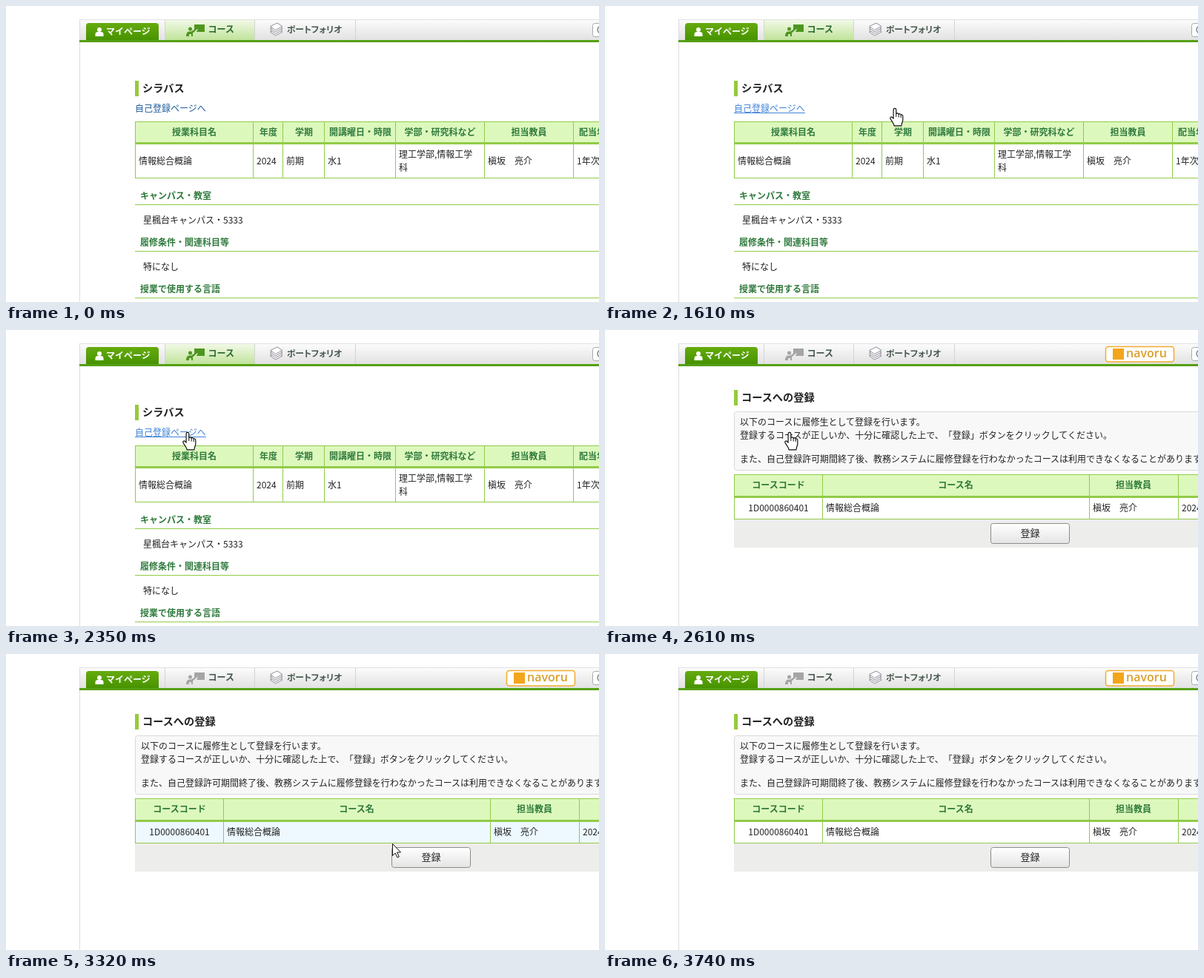
An HTML page for the animation above (4670 ms loop, 800 by 400 pixels).

```html
<!DOCTYPE html>
<html lang="ja">
<head>
<meta charset="utf-8">
<title>シラバス</title>
<style>
html, body { margin: 0; width: 100%; height: 100%; overflow: hidden; background: #fff; }
svg { display: block; width: 800px; height: 400px; }
text { font: 12px "Noto Sans CJK JP", "Noto Sans CJK", sans-serif; text-spacing-trim: space-all; fill: #222; }
.b { font-weight: 700; }
.head { font-weight: 700; fill: #2f7a3c; }
.title { font-size: 14.2px; font-weight: 700; }
.tight { font-size: 11.8px; font-feature-settings: "palt"; }
.logo { font: 600 16px "Open Sans", sans-serif; fill: #d9a02c; }
</style>
</head>
<body>
<svg id="stage" viewBox="0 0 800 400" xmlns="http://www.w3.org/2000/svg"></svg>
<script>
const LOOP = 4670;
const LINE = '#92cb48';

const rect = (x, y, w, h, fill, more = '') =>
  `<rect x="${x}" y="${y}" width="${w}" height="${h}" fill="${fill}" ${more}/>`;
const text = (x, y, s, cls = '', more = '') =>
  `<text x="${x}" y="${y}" class="${cls}" ${more}>${s}</text>`;
const mid = (x, y, s, cls) => text(x, y, s, cls, 'text-anchor="middle"');
const grad = (id, a, b) =>
  `<linearGradient id="${id}" x2="0" y2="1"><stop stop-color="${a}"/><stop offset="1" stop-color="${b}"/></linearGradient>`;

function table(top, headH, bottom, cols, rowId) {
  return rect(174, top, 626, headH, '#ddf8bd') +
    rect(174, top + headH, 626, bottom - top - headH, '#fff', `id="${rowId}"`) +
    rect(174, top, 626, 1, LINE) +
    rect(174, top + headH - 2, 626, 3, LINE) +
    rect(174, bottom, 626, 1, LINE) +
    cols.map(x => rect(x, top, 1, bottom - top, LINE)).join('');
}

const title = (y, s) => rect(174, y, 5, 21, '#96ca3c') + text(184, y + 15, s, 'title');

const section = (y, head, body) =>
  text(181, y, head, 'head') + rect(174, y + 7, 626, 1, LINE) + text(185, y + 33, body);

const defs = `<defs>
  ${grad('barFill', '#fcfcfc', '#e2e2e2')}
  ${grad('tabFill', '#65ab0c', '#479300')}
  ${grad('litFill', '#f1f9e6', '#c1e39b')}
  ${grad('btnFill', '#fff', '#e4e4e4')}
</defs>`;

const header =
  rect(99, 18, 701, 28, 'url(#barFill)') +
  rect(99, 18, 701, 1, '#e2e2e2') +
  rect(99, 18, 1, 382, '#dcdcdc') +
  rect(215, 19, 120, 27, 'url(#litFill)', 'id="lit"') +
  [214, 335, 471].map(x => rect(x, 19, 1, 27, '#d4d4d4')).join('') +
  rect(99, 46, 701, 3, '#559f13') +
  '<path d="M108 46V27q0-4 4-4h90q4 0 4 4v19z" fill="url(#tabFill)"/>' +
  '<g fill="#fff"><circle cx="126" cy="32" r="3"/><path d="M120.500 41v-3q0-3 3.500-3h4q3.500 0 3.500 3v3z"/></g>' +
  text(135, 38.5, 'マイページ', 'b', 'style="fill:#fff"') +
  `<g id="course">
    <path d="M254 25h14v10h-11l2-4-5 2z"/>
    <circle cx="248.500" cy="31" r="2.500"/>
    <path d="M243 41q0-6 4-6.500h3l6-4 1 1.500-5 4.500v4.500h-2v-3h-3v3z"/>
  </g>` +
  text(272.5, 36, 'コース', 'b', 'id="courseName"') +
  '<g fill="#fff" stroke="#918b99">' +
  [35, 32.5, 30, 27.5].map(y => `<path d="M356.500 ${y}l7 5 9.500-5-7-4.500z"/>`).join('') + '</g>' +
  text(379, 36, 'ポートフォリオ', 'b tight', 'style="fill:#47584e"') +
  rect(791.5, 23.5, 30, 18, '#fff', 'rx="3" stroke="#aaa"') +
  '<circle cx="803" cy="32" r="5" fill="none" stroke="#888" stroke-width="1.500"/>';

const heads = [[254, '授業科目名'], [354, '年度'], [402, '学期'], [478, '開講曜日・時限'],
  [585.5, '学部・研究科など'], [705.5, '担当教員'], [797, '配当年次']];
const cells = [[179, '情報総合概論'], [338, '2024'], [378, '前期'], [434, '水1'],
  [650, '槇坂　亮介'], [770, '1年次']];

const syllabus = '<g id="syllabus">' +
  title(101, 'シラバス') +
  text(174, 143, '自己登録ページへ', '', 'id="link"') +
  rect(174, 144, 96, 1, '#3f83d8', 'id="underline"') +
  table(156, 30, 232, [174, 333, 373, 429, 525, 645, 765], 'row1') +
  heads.map(([x, s]) => mid(x, 175, s, 'head')).join('') +
  cells.map(([x, s]) => text(x, 214, s)).join('') +
  text(530, 205, '理工学部,情報工学') + text(530, 223, '科') +
  section(261, 'キャンパス・教室', '星楓台キャンパス・5333') +
  section(324, '履修条件・関連科目等', '特になし') +
  section(387, '授業で使用する言語', '') +
  '</g>';

const entry = '<g id="entry">' +
  rect(675.5, 22.5, 92, 20.5, '#fff', 'rx="3.500" stroke="#f2ad2c" stroke-width="1.500"') +
  rect(685, 25, 15, 15, '#f3a51c') +
  text(703, 37, 'navoru', 'logo') +
  title(81, 'コースへの登録') +
  rect(174.5, 110.5, 640, 79, '#f8f8f8', 'rx="3" stroke="#dadada"') +
  text(182, 129, '以下のコースに履修生として登録を行います。') +
  text(182, 147, '登録するコースが正しいか、十分に確認した上で、「登録」ボタンをクリックしてください。') +
  text(182, 179, 'また、自己登録許可期間終了後、教務システムに履修登録を行わなかったコースは利用できなくなることがあります。') +
  table(195, 31, 255, [174, 293, 653, 773], 'row2') +
  mid(234, 214, 'コースコード', 'head') + mid(473, 214, 'コース名', 'head') + mid(713, 214, '担当教員', 'head') +
  mid(234, 245, '1D0000860401') + text(298, 245, '情報総合概論') +
  text(658, 245, '槇坂　亮介') + text(778, 245, '2024年度') +
  rect(174, 256, 626, 38, '#ededec') +
  rect(520.5, 261.5, 106, 27, 'url(#btnFill)', 'rx="3" stroke="#8c8c8c"') +
  text(573.5, 279, '登録', '', 'text-anchor="middle" style="font-size:13px"') +
  '</g>';

const pointer =
  '<circle id="click" cx="248" cy="139" r="12" fill="#ff0" fill-opacity=".47"/>' +
  '<g id="cursor" fill="#fff" stroke="#111" stroke-linejoin="round">' +
  '<path id="arrow" d="M.5 .5V16.500L4.200 13 7 19 9.300 18 6.600 12H11.500Z"/>' +
  `<g id="hand" transform="translate(1 0)"><path stroke-width="1.200" d="M-1.900 1.200C-1.900-1.200 1.800-1.200 1.800 1.200V6.600
    C2.600 5.400 5 5.600 5.200 7.300 6 6.300 8 6.600 8.200 8.200 9.200 7.500 10.800 8 10.800 9.800V15C10.800 17.500 9 19 9 22.800H-1
    C-1 20-4.500 16.500-6 13.300-6.800 11.500-4.800 10-3.300 11.600L-1.900 13.200Z"/>
    <path fill="none" d="M1.800 6.600V11M5.200 7.300V11.500M8.200 8.200V12"/></g>` +
  '</g>';

document.getElementById('stage').innerHTML = defs + header + syllabus + entry + pointer;
const $ = id => document.getElementById(id);
const show = (id, on) => $(id).setAttribute('visibility', on ? 'visible' : 'hidden');
const paint = (id, color) => { $(id).style.fill = color; };

// Pointer path: time, x, y
const path = [
  [1120, 576, 381], [1260, 556, 327], [1400, 505, 242], [1540, 428, 160], [1610, 390, 139],
  [1750, 318, 138], [1890, 256, 139], [1960, 248, 139], [2610, 248, 139], [2820, 275, 141],
  [3110, 400, 161], [3180, 434, 176], [3250, 480, 203], [3320, 521, 256],
  [3460, 556, 320], [3600, 574, 372], [3670, 578, 383]
];

function slope(i, k) {
  const a = path[Math.max(i - 1, 0)], b = path[Math.min(i + 1, path.length - 1)];
  return (b[k] - a[k]) / (b[0] - a[0]);
}

function along(t, k) {
  const last = path.length - 1;
  if (t <= path[0][0]) return path[0][k];
  if (t >= path[last][0]) return path[last][k];
  const i = path.findIndex(p => p[0] > t) - 1;
  const a = path[i], b = path[i + 1], d = b[0] - a[0], u = (t - a[0]) / d;
  const v = 1 - u;
  return v * v * ((1 + 2 * u) * a[k] + u * d * slope(i, k)) +
    u * u * ((3 - 2 * u) * b[k] - v * d * slope(i + 1, k));
}

function tick(t) {
  const base = t < 2610 ? 1120 : t < 3180 ? 2610 : 3180;
  return base + Math.floor((t - base) / 70) * 70;
}

function draw(t) {
  const second = t >= 2610;
  const visible = t >= 1120 && t < 3740;
  const hand = t >= 1610 && t < 2680;
  const hover = t >= 1610 && !second;
  const at = tick(t), x = Math.round(along(at, 1)), y = Math.round(along(at, 2));

  $('syllabus').style.display = second ? 'none' : '';
  $('entry').style.display = second ? '' : 'none';
  show('lit', !second);
  paint('course', second ? '#a5a5a5' : '#4f9620');
  paint('courseName', second ? '#47584e' : '#2c6a35');
  paint('link', hover ? '#3f83d8' : '#1f5c9c');
  $('underline').style.opacity = hover ? 1 : 0;
  paint('row2', visible && y > 227 && y < 259 ? '#eef9ff' : '#fff');

  show('click', (t >= 2010 && t < 2080) || (t >= 2280 && t < 2350));
  show('arrow', visible && !hand);
  show('hand', visible && hand);
  $('cursor').setAttribute('transform', `translate(${x} ${y})`);
}

const start = performance.now();
function frame() {
  draw((performance.now() - start) % LOOP);
  requestAnimationFrame(frame);
}
frame();
</script>
</body>
</html>
```
